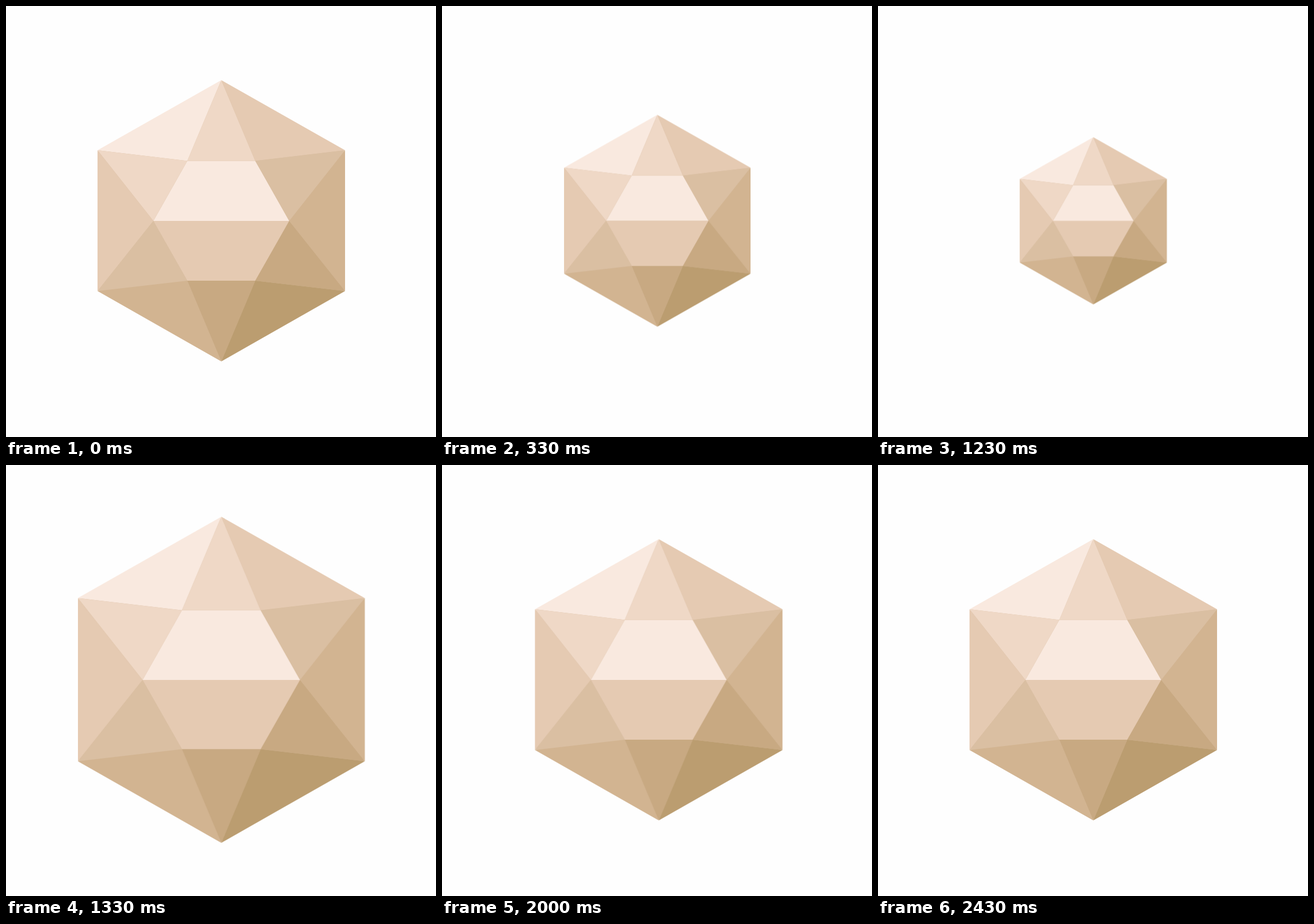
These frames come from a looping animation (747x750 px, 3.01 s). An HTML page:

```html
<!DOCTYPE html>
<html lang="en">
<head>
<meta charset="utf-8">
<title>Faceted gem</title>
<style>
  html, body { margin: 0; width: 100%; height: 100%; overflow: hidden; background: #fefefe; }
  svg { display: block; width: 747px; height: 750px; }

  /* Paused: the script steps the delay so poses are held at 30 per second. */
  #gem {
    transform-origin: 374px 373.75px;
    animation: pop 3000ms linear infinite paused;
    animation-delay: calc(var(--now, 0) * -1ms);
  }
  #gem, #gem * { --smooth: cubic-bezier(.333, 0, .667, 1); }

  @keyframes pop {
    0%       { transform: translateX(0) scale(1); animation-timing-function: cubic-bezier(.333, 0, .667, 1); }
    5.5556%  { transform: translateX(0) scale(1.2); animation-timing-function: cubic-bezier(.337, 0, .394, 1); }
    22.2222% { transform: translateX(0) scale(0); }
    33.3333% { transform: translateX(0) scale(0); animation-timing-function: cubic-bezier(.67, 0, .7, 1); }
    45.5556% { transform: translateX(0) scale(1.2); animation-timing-function: cubic-bezier(.333, 0, .667, 1); }
    50%      { transform: translateX(0) scale(1); }
    61.1111% { transform: translateX(0) scale(1); animation-timing-function: cubic-bezier(.333, 0, .667, 1); }
    64.4444% { transform: translateX(-19px) scale(1); animation-timing-function: cubic-bezier(.333, 0, .667, 1); }
    68.8889% { transform: translateX(24px) scale(1); animation-timing-function: cubic-bezier(.333, 0, .667, 1); }
    73.3333% { transform: translateX(-19px) scale(1); animation-timing-function: cubic-bezier(.333, 0, .667, 1); }
    77.7778% { transform: translateX(24px) scale(1); animation-timing-function: cubic-bezier(.333, 0, .667, 1); }
    81.1111%, 100% { transform: translateX(0) scale(1); }
  }
</style>
</head>
<body>
<svg viewBox="0 0 747 750">
  <g id="gem">
    <!-- backing hides hairline seams between facets -->
    <path fill="#dabfa2" d="M374 131L587 252V495L374 616.5L161 495V252Z"/>
    <path fill="#f9e9df" d="M374 129L159 251L315 269.5Z M315 269.5H433L492 374H256Z"/>
    <path fill="#efd8c6" d="M374 129L315 269.5H433Z M159 251L315 269.5L256 374Z"/>
    <path fill="#e5cab2" d="M374 129L589 251L433 269.5Z M159 251V496L256 374Z M256 374H492L433 478H315Z"/>
    <path fill="#dabfa2" d="M589 251L433 269.5L492 374Z M159 496L256 374L315 478Z"/>
    <path fill="#d2b491" d="M589 251V496L492 374Z M159 496L315 478L374 618.5Z"/>
    <path fill="#c8a982" d="M492 374L433 478L589 496Z M315 478H433L374 618.5Z"/>
    <path fill="#bb9d70" d="M433 478L589 496L374 618.5Z"/>
  </g>
</svg>
<script>
  const LOOP = 3010, STEPS = 90;
  const gem = document.getElementById('gem');
  let start;

  // Step boundaries fall on whole hundredths of a second.
  function stepAt(ms) {
    const step = Math.ceil((Math.floor(ms / 10) + 0.5) * 0.3) - 1;
    return Math.min(step, STEPS - 1);
  }

  function draw(time) {
    start ??= time;
    const step = stepAt((time - start) % LOOP);
    gem.style.setProperty('--now', (step * 100 / 3).toFixed(2));
    requestAnimationFrame(draw);
  }
  requestAnimationFrame(draw);
</script>
</body>
</html>
```
